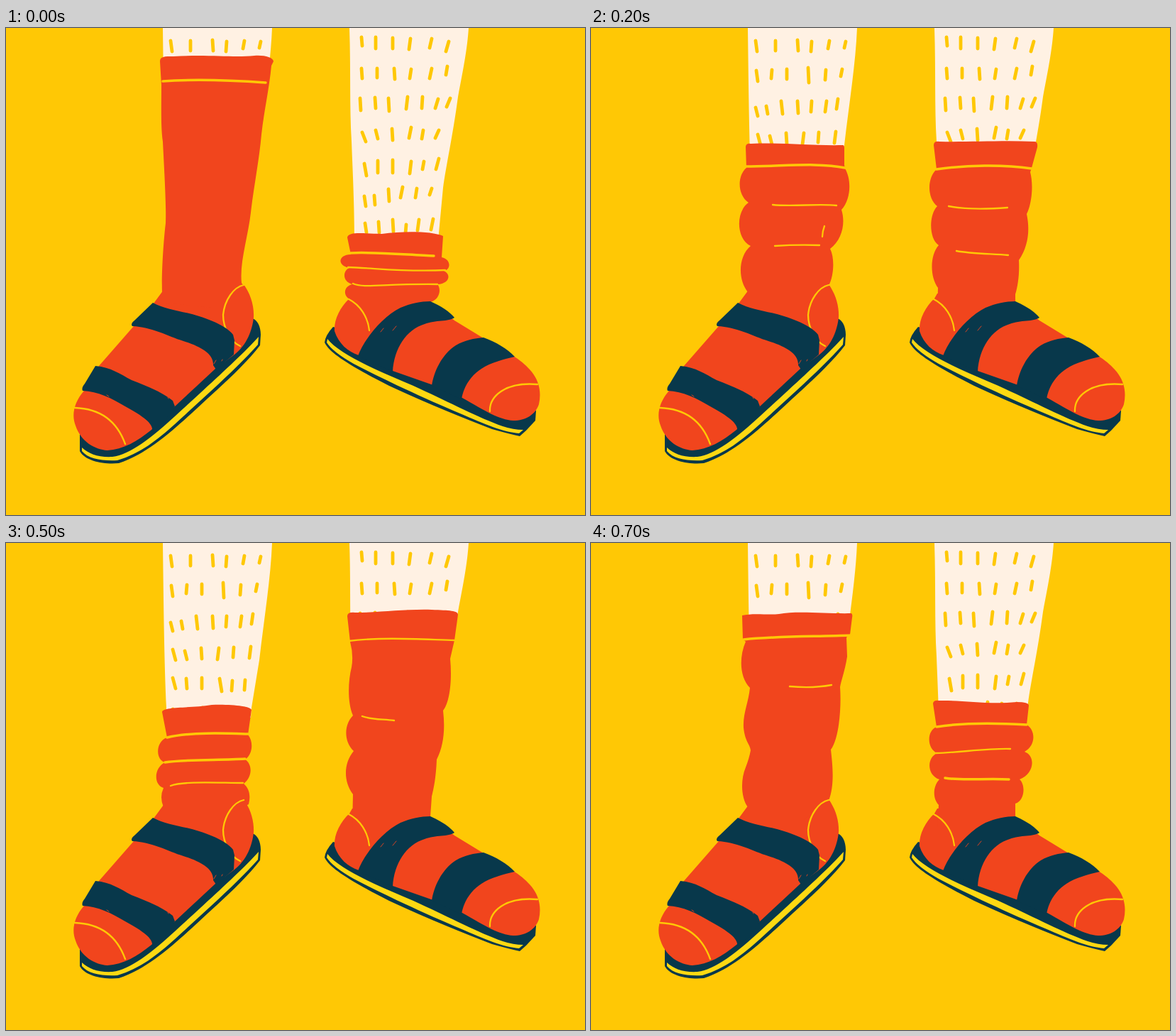
An HTML page for the animation above (800 ms loop, 816 by 686 pixels).

```html
<!DOCTYPE html>
<html lang="en">
<head>
<meta charset="utf-8">
<title>Socks and sandals</title>
<style>
  html, body { margin: 0; width: 100%; height: 100%; overflow: hidden; background: #ffc805; }
  svg { display: block; width: 100%; height: 100%; }
  .leg { fill: #fff1e3; }
  .sock { fill: #f1451d; }
  .sole, .strap { fill: #08384b; }
  .rim { fill: #fdd912; }
  .hair, .seam, .fold, .speck { fill: none; stroke: #ffc805; stroke-linecap: round; }
  .hair { stroke-width: 4.8; }
  .seam { stroke-width: 3.5; }
  .fold { stroke-width: 2.3; }
  .speck { stroke: #f1451d; stroke-width: .9; }
</style>
</head>
<body>
<svg id="stage" viewBox="0 0 816 686"></svg>
<script>
const STEP = 100, STEPS = 8;
const stage = document.getElementById('stage');

function add(parent, tag, attrs) {
  const el = document.createElementNS('http://www.w3.org/2000/svg', tag);
  for (const key in attrs) el.setAttribute(key, attrs[key]);
  parent.appendChild(el);
  return el;
}
const shape = (cls, d = '') => add(stage, 'path', { class: cls, d });

// Each pose: where the leg ends, the sock outline, the cuff seam, the fold lines.
const pose = (cut, sock, seam, fold = '') => ({ cut, sock, seam, fold });

const left = {
  leg: 'M221 0H375C373 50 364 105 357 165L346 232L340 310H226L226 232C223 170 222 80 221 0Z',
  hair: [
    'M232 18l2 15M260 18v14M291 17l1 15M311 19l-1 14M336 18l-2 11M359 19l-2 9',
    'M233 60l2 15M255 59l-1 12M276 58v14M306 56l1 21M331 59l-1 14M354 58l-2 10',
    'M232 112l3 12M247 110l2 11M268 103l2 18M291 103l1 17M311 103l-1 15M332 103l-2 15M348 100l-2 14',
    'M235 150l4 15M252 152l3 12M275 148l1 15M300 148l-2 16M321 147l-1 14M345 146l-2 16',
    'M235 190l4 15M254 191l1 14M276 190v15M301 191l3 18M319 194l-1 14M337 193l-1 14',
    'M235 234l3 14M255 235l1 13M277 232v16M301 233l-1 15M319 235l-1 12M336 233l-2 12',
    'M237 274l2 14M257 273l1 15M279 272v15M301 275l-1 13M320 272l-2 15'
  ],
  poses: [
    pose(56,
      'M217 47C217 40 223 40 236 40C285 37 320 42 350 39C364 38 376 41 377 47L374 53C371 85 364 115 360 150C357 185 349 225 345 260C341 295 329 330 332 359L336 366L300 395L210 386L220 373C219 345 222 300 225 275C226 250 223 200 221 160C218 140 219 110 219 80Z',
      'M221 75C260 72 310 73 366 77'),
    pose(115,
      'M213 102C230 98 250 102 265 100C290 95 335 100 367 99Q369 101 368 105L365 129L360 133L361 160C358 180 352 195 351 203C353 230 350 275 338 291C340 310 344 340 335 363L300 390H208L221 372C212 360 210 335 218 316Q223 303 225 292C224 283 217 280 215 260C214 240 222 225 224 204C210 190 208 162 218 139L214 136Z',
      'M215 136C260 131 310 132 367 130',
      'M280 202Q312 205 339 200'),
    pose(180,
      'M218 167Q219 162 225 163C270 161 310 166 355 165Q357 165 357 169L357 193L358 198C367 213 367 240 353 256C359 275 354 298 337 311C344 325 342 350 335 363L300 390H208L221 372C207 355 207 322 225 307C204 297 204 258 222 246C206 235 206 208 219 197Z',
      'M218 195C270 195 320 189 358 197',
      'M256 249C285 252 320 247 346 250M259 307Q290 305 322 306M326 294Q326 287 329 279'),
    pose(246,
      'M220 238C221 230 260 233 290 228C318 227 345 230 346 235L341 270C349 280 348 297 337 305C348 312 347 330 335 339C343 346 345 356 342 368L300 390H208L222 372Q216 358 222 345C208 341 208 317 224 309C210 305 211 279 227 274Z',
      'M227 274C260 266 310 268 341 269M224 309C250 305 300 306 337 304',
      'M232 342C250 335 300 338 334 338'),
    pose(306,
      'M221 295C222 288 250 290 280 290C310 287 336 288 345 292L342 321C354 325 353 337 344 340C354 344 352 357 340 359C347 365 345 376 340 380L300 390H208L222 380C211 374 214 362 222 359C209 355 209 343 220 339C207 334 210 321 225 319Z',
      'M225 318C260 316 300 321 339 321',
      'M221 339C260 338 300 343 343 340M224 360C245 366 270 359 340 360')
  ]
};

const right = {
  leg: 'M484 0H652C650 30 645 55 637 97C630 150 620 195 616 225L608 310H491C491 240 488 190 487 160C484 110 486 60 484 0Z',
  hair: [
    'M501 13l1 12M521 13v16M545 14v15M570 15l-2 15M600 15l-3 13M624 19l-4 14',
    'M501 57l1 14M523 57v13M547 57l1 15M571 58l-2 13M600 57l-3 14M622 54l-2 12',
    'M499 99l1 17M520 98l1 15M539 99l1 18M566 97l-2 17M587 97l-1 16M609 100l-4 13M626 99l-5 12',
    'M502 147l5 13M521 144l3 12M544 142l1 16M571 140l-3 15M588 144l-2 12M610 144l-5 11',
    'M505 191l3 17M524 187v17M545 186v18M571 188l-2 17M589 188l-2 11M610 184l-4 15',
    'M505 237l2 14M519 236l1 13M539 227l1 17M559 224l-3 15M579 226l-2 13M600 226l-3 9',
    'M506 275l2 13M525 273l1 15M545 270l1 17M564 277l-1 12M582 270l-2 15M602 269l-3 15'
  ],
  poses: [
    pose(306,
      'M481 295C483 286 505 290 530 290C560 286 600 286 616 293L614 323C628 326 627 341 617 342C628 347 625 360 608 361C614 368 611 383 598 386L560 400H488L488 384C474 379 475 364 488 361C473 357 475 341 484 338C466 335 468 319 486 319Z',
      'M485 317C520 315 570 320 603 321',
      'M482 337C520 338 560 344 619 341M489 360C505 367 530 360 608 361'),
    pose(240,
      'M482 226Q483 221 490 222C520 221 560 228 600 224Q617 224 617 229L614 256C627 264 627 285 611 294C627 300 625 325 604 333C613 341 611 363 598 367V386L560 400H488L490 369C481 360 482 342 491 333C473 327 473 302 488 296C473 290 473 264 487 259Z',
      'M487 259C530 252 580 254 614 256M499 331C520 335 560 331 589 333',
      'M486 296C520 295 560 289 591 290'),
    pose(176,
      'M483 165Q483 159 491 160C530 161 580 158 625 160Q630 160 629 168L621 197L619 203C624 222 621 248 614 262C619 285 616 308 603 327C604 345 602 362 598 375V386L560 400H488L489 366C477 350 478 319 490 306C476 297 476 263 488 251C474 240 473 212 487 199Z',
      'M487 199C530 193 580 192 621 198',
      'M504 251C530 256 560 255 587 253M515 314C535 318 565 318 588 320'),
    pose(110,
      'M481 103Q481 97 492 98C530 98 560 93 600 94C625 95 637 95 637 101L632 137L626 163C629 195 625 225 616 236C619 262 617 285 607 305C606 330 603 345 600 357L598 386L560 400H488L489 354C475 335 476 310 490 293C476 280 476 256 489 243C481 225 482 195 487 175Q490 158 485 139Z',
      '',
      'M483 138C530 132 590 136 632 137M502 244C515 249 530 248 547 250'),
    pose(42,
      'M481 32C483 26 500 28 530 28C580 24 625 26 653 29L651 37C648 70 640 105 634 140C624 200 616 240 611 290C607 330 601 360 598 386L560 400H488L489 370C491 320 490 270 489 220C488 180 484 120 484 60Z',
      'M485 63C530 59 590 61 643 63')
  ]
};

function buildLeg(id, data) {
  const clip = add(stage, 'clipPath', { id });
  const mask = add(clip, 'rect', { x: 0, y: 0, width: 816, height: 0 });
  for (const [cls, d] of [['leg', data.leg], ['hair', data.hair.join('')]])
    shape(cls, d).setAttribute('clip-path', `url(#${id})`);
  return { poses: data.poses, mask };
}

const legs = [buildLeg('cutLeft', left), buildLeg('cutRight', right)];

// Soles and feet
shape('sole', 'M347 409C354 411 359 420 359 432L358 447C335 477 300 507 270 535C238 564 200 600 159 613C140 615 112 611 104 596V572L200 540Z');
shape('rim', 'M356 435C330 464 280 508 238 547C205 577 175 601 150 604C130 605 117 600 107 591V596C116 607 135 610 157 609C190 599 212 581 238 558C280 519 325 480 355 446Z');
shape('sole', 'M461 421Q450 433 449 443C456 458 485 476 540 504C590 527 640 548 685 565Q710 572 724 575L733 567L746 553L747 539L600 460Z');
shape('rim', 'M453 438C468 457 510 477 560 498C610 519 660 547 700 561Q715 566 729 566L723 571C700 569 675 558 640 543C590 522 530 494 490 473Q460 456 452 443Z');
shape('sock', 'M222 369L208 388L180 420L131 476L110 511C96 527 92 545 98 560C105 582 125 594 143 595C165 594 185 582 205 566L238 533L295 480L322 460C340 446 347 425 349 408C350 390 344 374 335 361Z');
shape('sock', 'M484 381C470 394 462 412 463 427C469 445 482 456 497 461L545 483L602 503L643 521C675 539 695 552 715 553C732 553 746 545 751 530C755 512 751 495 738 481Q728 470 715 462L673 437L632 412L598 386V374H488Z');

for (const leg of legs)
  for (const part of ['sock', 'seam', 'fold']) leg[part] = shape(part);

// Toe and heel lines
shape('fold', 'M97 535C128 536 155 550 168 586M335 362C321 365 308 383 306 404C306 422 316 442 330 448');
shape('fold', 'M682 540C681 520 702 498 749 502M483 382C499 390 510 407 512 426');

// Straps
shape('strap', 'M207 387C222 395 240 398 258 402C285 409 310 419 320 432L322 440L321 460L296 481L292 475C293 458 272 448 250 441C228 434 205 421 178 420Q175 417 181 412Z');
shape('strap', 'M126 476C148 478 160 487 177 496C198 504 220 513 235 525L238 533L222 556L206 567C208 556 188 544 168 533C148 521 130 512 108 511Q106 507 111 501Z');
shape('strap', 'M598 385C612 391 626 400 632 408C624 414 605 411 590 417C564 425 547 451 545 484L496 462C505 438 530 407 556 394C570 388 585 385 598 385Z');
shape('strap', 'M673 436C690 442 707 452 717 463C700 467 684 471 670 480C656 489 645 504 642 523L600 504C603 484 614 460 634 447C646 440 660 437 673 436Z');
shape('speck', 'M528 428l4 -5M545 426l5 -6M293 473l3 -5M304 469l1 -2M142 517l3 2M228 520l1 2');

function draw(time) {
  const step = Math.floor(time / STEP) % STEPS;
  const index = Math.min(step, STEPS - step);
  for (const leg of legs) {
    const now = leg.poses[index];
    leg.mask.setAttribute('height', now.cut);
    for (const part of ['sock', 'seam', 'fold']) leg[part].setAttribute('d', now[part]);
  }
}

const start = performance.now();
function tick() {
  draw(performance.now() - start);
  requestAnimationFrame(tick);
}
tick();
</script>
</body>
</html>
```
